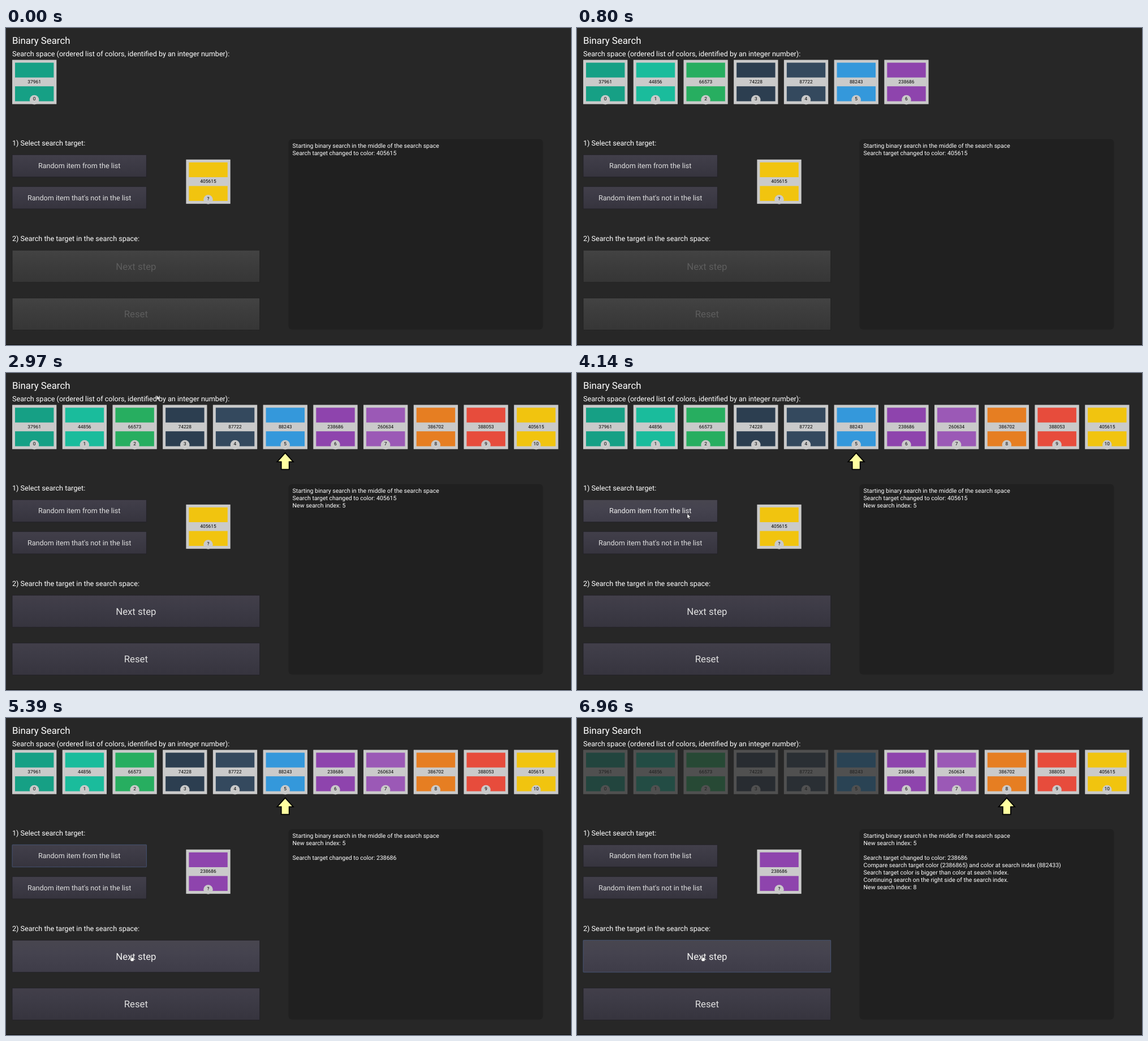
An HTML page that plays this animation: 999x561 px, repeating every 8000 ms.

```html
<!DOCTYPE html>
<html lang="en">
<head>
<meta charset="utf-8">
<title>Binary Search</title>
<style>
  html, body { margin: 0; width: 100%; height: 100%; overflow: hidden; background: #272727; }
  svg { display: block; width: 999px; height: 561px; }
  text { font-family: Roboto, sans-serif; text-rendering: geometricPrecision; white-space: pre; }
</style>
</head>
<body>
<svg viewBox="0 0 999 561">
  <defs id="gradients"></defs>
  <g id="scene"></g>
</svg>
<script>
const LOOP = 8000;
const ITEMS = [
  [37961, '#16a085'], [44856, '#1abc9c'], [66573, '#27ae60'], [74228, '#2c3e50'],
  [87722, '#34495e'], [88243, '#3498db'], [238686, '#8e44ad'], [260634, '#9b59b6'],
  [386702, '#e67e22'], [388053, '#e74c3c'], [405615, '#f1c40f']
];
const CARD_TIMES = [0, 80, 250, 320, 490, 570, 720, 810, 930, 1010, 1180];
const READY = 1180, CLICK_1 = 4220, PICKED = 4310, CLICK_2 = 6340, COMPARED = 6490, MOVED = 6960;

// Button looks: gradient top, middle, bottom, text, border
const LOOKS = {
  normal: ['#423f4a', '#3d3b46', '#36343e', '#e0e0e0', '#201f25'],
  hover: ['#48464f', '#45434f', '#3e3c48', '#f0f0f0', '#201f25'],
  pressed: ['#16161a', '#09090b', '#2c2b32', '#ffffff', '#201f25'],
  disabled: ['#434343', '#3d3d3d', '#363636', '#5d5d5d', '#202020']
};
const FOCUS = '#4a5b80';

// Pointer path: time, x, y
const PATH = [
  [2970, 267, 39], [3050, 251, 88], [3130, 238, 142], [3200, 235, 174], [3280, 240, 189],
  [3450, 239, 189], [3740, 239, 189], [4140, 195, 249], [4900, 195, 249], [5390, 222, 420]
];

document.getElementById('gradients').innerHTML = Object.entries(LOOKS).map(([name, c]) =>
  `<linearGradient id="${name}" x2="0" y2="1"><stop stop-color="${c[0]}"/>
   <stop offset=".4" stop-color="${c[1]}"/><stop offset="1" stop-color="${c[2]}"/></linearGradient>`).join('');

const rect = (x, y, w, h, fill, extra = '') =>
  `<rect x="${x}" y="${y}" width="${w}" height="${h}" fill="${fill}" ${extra}/>`;

const text = (x, y, size, str, fill = '#fff', anchor = 'start') =>
  `<text x="${x}" y="${y}" font-size="${size}" fill="${fill}" text-anchor="${anchor}">${str}</text>`;

const cardX = i => 11 + i * 88.72;

function card(x, y, [number, color], label, opacity = 1) {
  return `<g transform="translate(${x} ${y})" opacity="${opacity}">
    ${rect(0, 0, 78.3, 78.3, '#cacaca')}
    ${rect(5, 5, 68.4, 26.2, color)}${rect(5, 46.8, 68.4, 26.4, color)}
    <circle cx="39.1" cy="70.7" r="8.3" fill="#cacaca"/>
    ${text(39.1, 41.7, 8.4, number, '#000', 'middle')}${text(39.1, 72.1, 8.4, label, '#000', 'middle')}</g>`;
}

function button(y, w, h, label, size, look, focused) {
  const [, , , ink, border] = LOOKS[look];
  return rect(11, y, w, h, `url(#${look})`, `stroke="${focused ? FOCUS : border}" stroke-width=".8" rx=".7"`) +
    text(11 + w / 2, y + h / 2 + size * .357, size, label, ink, 'middle');
}

function marker(i) {
  return `<path transform="translate(${cardX(i) + 39.1} 141.3)" d="M0 0L14.2 15.8H7V29.4H-7V15.8H-14.2Z"
    fill="#ffffa0" stroke="#000" stroke-width="1.8"/>`;
}

function logLines(t) {
  const lines = ['Starting binary search in the middle of the search space'];
  if (t < PICKED) {
    lines.push('Search target changed to color: 405615');
    if (t >= READY) lines.push('New search index: 5');
  } else {
    lines.push('New search index: 5', '', 'Search target changed to color: 238686');
  }
  if (t >= COMPARED) lines.push(
    'Compare search target color (2386865) and color at search index (882433)',
    'Search target color is bigger than color at search index.',
    'Continuing search on the right side of the search index.');
  if (t >= MOVED) lines.push('New search index: 8');
  return lines;
}

function pointerAt(t) {
  const next = PATH.findIndex(p => p[0] > t);
  if (next < 0) return PATH[PATH.length - 1].slice(1);
  const [t0, x0, y0] = PATH[next - 1], [t1, x1, y1] = PATH[next];
  let k = (t - t0) / (t1 - t0);
  if (t > 3280) k = k * k * (3 - 2 * k);
  return [x0 + (x1 - x0) * k, y0 + (y1 - y0) * k];
}

function pointer(t, hand, clicking) {
  if (t < PATH[0][0]) return '';
  const [x, y] = pointerAt(t);
  const shape = hand
    ? 'M-.8 .6Q0-.4 .8 .6V4L3.6 4.6Q4.6 5 4.4 6.4L3.6 10.6H-.8L-3 7Q-3.2 5.6-1.8 6.2L-.8 7Z'
    : 'M0 0V8.2L1.8 6.6L3.1 9.6L4.5 9L3.2 6.1H5.7Z';
  return `<g transform="translate(${x} ${y})">
    ${clicking ? '<circle cx="-.8" cy="-1" r="6.6" fill="#e6dc00" opacity=".65"/>' : ''}
    <path d="${shape}" fill="#fff" stroke="#222" stroke-width=".5"/></g>`;
}

function scene(t) {
  const on = (from, to) => t >= from && t < to;
  const pick = on(CLICK_1, PICKED), step = on(CLICK_2, COMPARED);
  const look = (hovered, pressed) => pressed ? 'pressed' : hovered ? 'hover' : 'normal';
  const overPick = on(4000, 5020), overStep = t >= 5250;
  const idle = t < READY;

  return rect(0, 0, 999, 561, '#272727') + rect(0, 560, 999, 1, '#111') +
    text(11, 27.8, 16.8, 'Binary Search') +
    text(11, 49.5, 12.6, 'Search space (ordered list of colors, identified by an integer number):') +
    ITEMS.map((item, i) => t < CARD_TIMES[i] ? '' :
      card(cardX(i), 56.4, item, i, t >= COMPARED && i <= 5 ? .25 : 1)).join('') +
    (idle ? '' : marker(t < MOVED ? 5 : 8)) +
    text(11, 207.8, 12.6, '1) Select search target:') +
    button(224.3, 237.4, 39.4, 'Random item from the list', 12.6, look(overPick, pick), on(CLICK_1, CLICK_2)) +
    button(280.7, 237.4, 39.4, "Random item that's not in the list", 12.6, 'normal') +
    card(318.4, 232.8, ITEMS[t < PICKED ? 10 : 6], '?') +
    text(11, 377, 12.6, '2) Search the target in the search space:') +
    button(393.3, 437.7, 56.6, 'Next step', 16.8, idle ? 'disabled' : look(overStep, step), t >= CLICK_2) +
    button(477.9, 437.7, 56.6, 'Reset', 16.8, idle ? 'disabled' : 'normal') +
    rect(499.5, 196.8, 450, 336.8, '#202020', 'rx="6"') +
    logLines(t).map((line, i) => text(506.6, 211.6 + i * 13.03, 10.5, line)).join('') +
    pointer(t, t >= CLICK_1, pick || step);
}

const root = document.getElementById('scene');
let shown = '';
function tick() {
  const markup = scene(performance.now() % LOOP);
  if (markup !== shown) root.innerHTML = shown = markup;
  requestAnimationFrame(tick);
}
tick();
</script>
</body>
</html>
```
